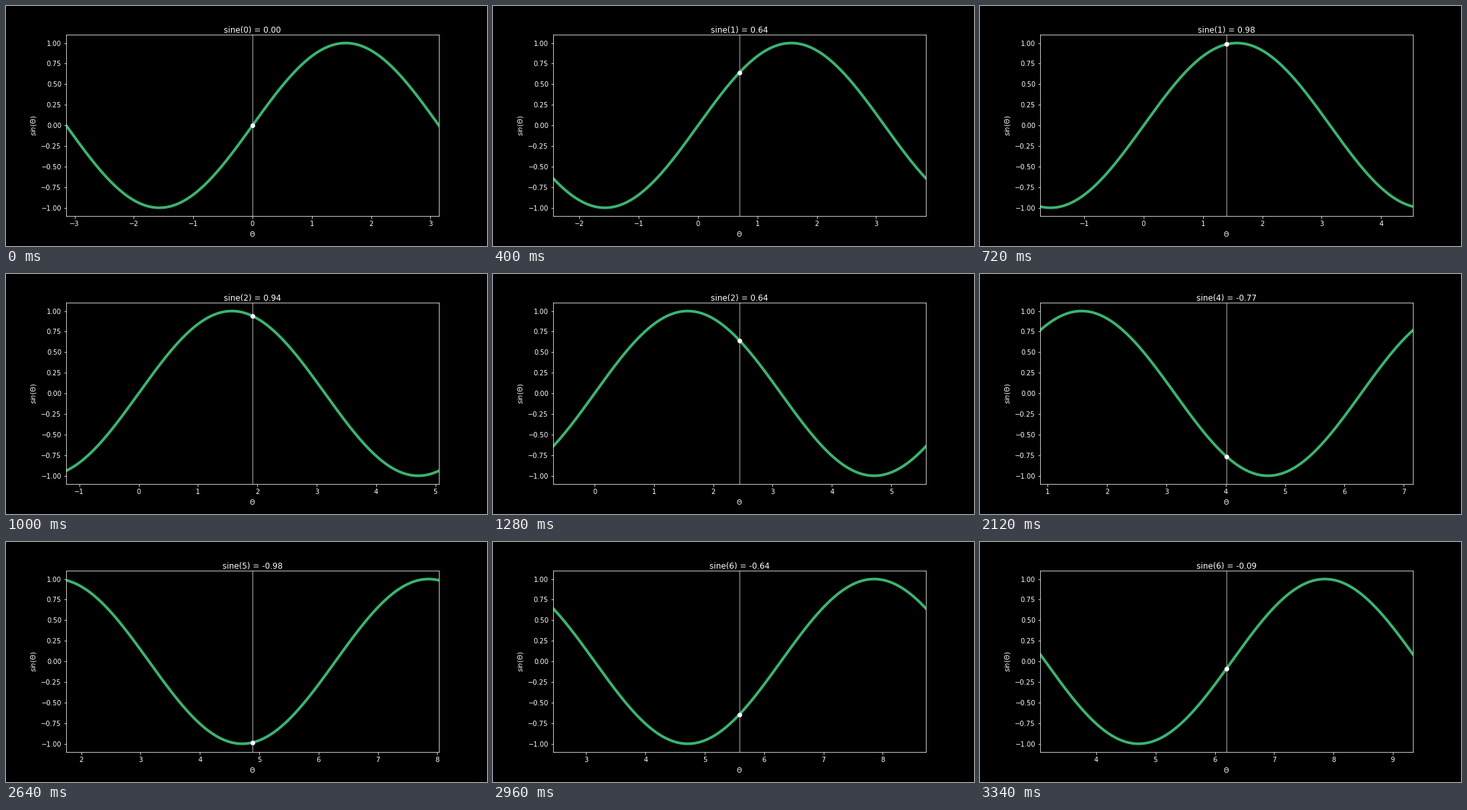
Recreate the animation shown at these times as a matplotlib script. Size 720 px wide and 360 px high, loop 3.44 s.

```python
import matplotlib.pyplot as plt
import numpy as np
from matplotlib.animation import FuncAnimation
from matplotlib.ticker import MultipleLocator

STEPS = 72          # one turn in 5 degree steps
TICK_MS = 20
LONG_HOLD = 5       # ticks


def hold(step):
    """Ticks a step stays on screen: every third one lingers, as does the last."""
    return LONG_HOLD if step % 3 == 1 or step == STEPS - 1 else 1


schedule = [step for step in range(STEPS) for _ in range(hold(step))]

plt.style.use("dark_background")
plt.rcParams["font.family"] = "DejaVu Sans"

fig, ax = plt.subplots(figsize=(10, 5), dpi=72)
fig.subplots_adjust(left=0.125, right=0.9, bottom=0.125, top=0.88)

theta = np.linspace(-2 * np.pi, 4 * np.pi, 1200)
ax.plot(theta, np.sin(theta), color="mediumseagreen", lw=4)
cursor = ax.axvline(0, color="0.67", lw=1)
dot, = ax.plot([0], [0], "o", color="white", ms=6)

ax.set_ylim(-1.1, 1.1)
ax.set_yticks(np.arange(-1, 1.01, 0.25))
ax.xaxis.set_major_locator(MultipleLocator(1))
ax.set_xlabel(r"$\Theta$")
ax.set_ylabel(r"$sin(\Theta)$")
title = ax.set_title("", fontsize=12, pad=3)


def update(tick):
    angle = 2 * np.pi * schedule[tick] / STEPS
    value = np.sin(angle)
    ax.set_xlim(angle - np.pi, angle + np.pi)
    cursor.set_xdata([angle, angle])
    dot.set_data([angle], [value])
    title.set_text(f"sine({angle:.0f}) = {value:.2f}")
    return cursor, dot, title


animation = FuncAnimation(fig, update, frames=len(schedule), interval=TICK_MS,
                          init_func=lambda: update(0), repeat=True,
                          repeat_delay=0, blit=False)
plt.show()
```
